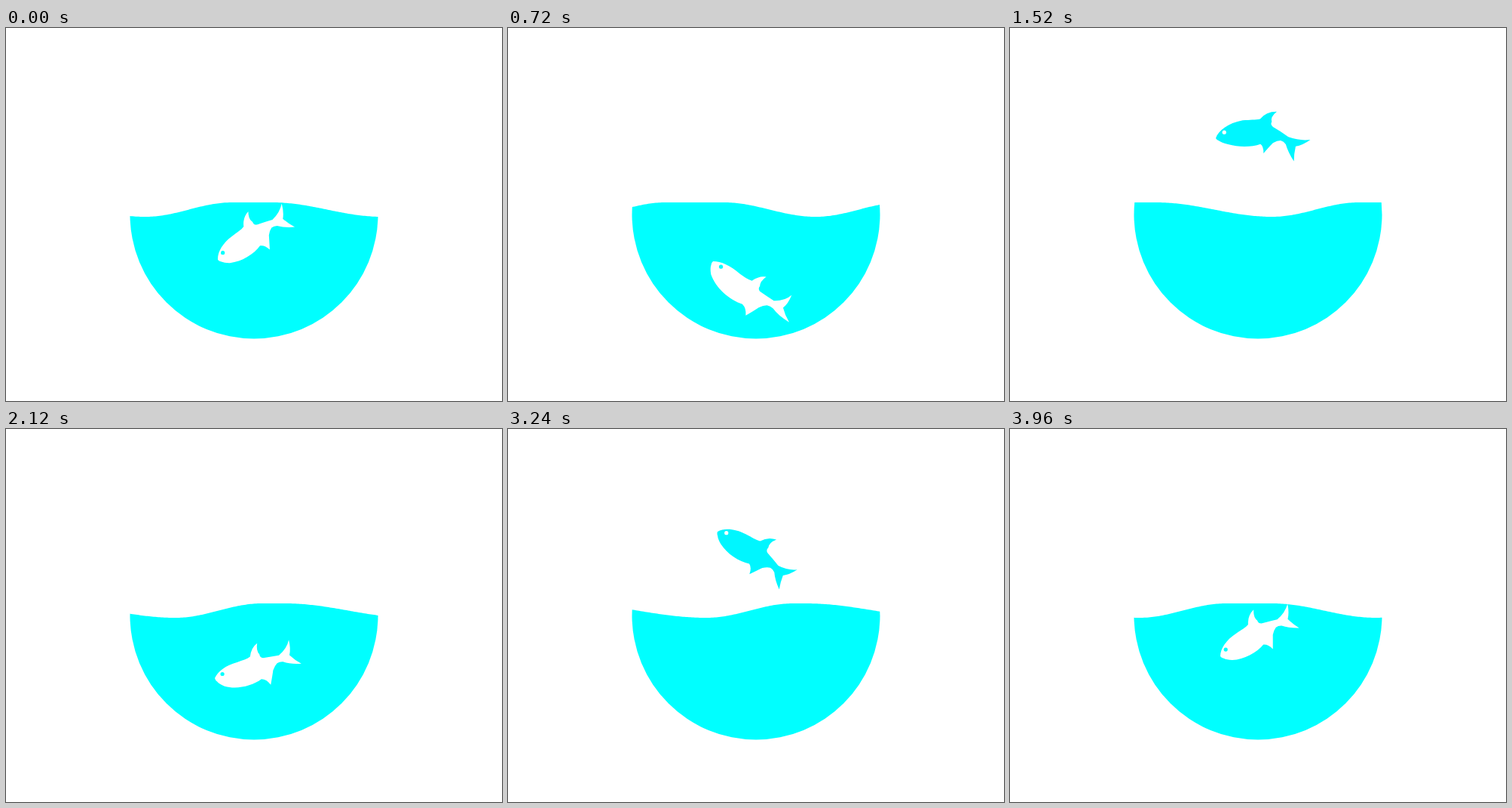
Recreate the animation shown at these times as an HTML page. Size 658 by 494 pixels, loop 4000 ms.

```html
<!DOCTYPE html>
<html lang="en">
<head>
<meta charset="utf-8">
<title>Fish bowl</title>
<style>
  html, body { margin: 0; width: 100%; height: 100%; overflow: hidden; background: #fff; }
  svg { display: block; width: 100vw; height: 100vh; }
</style>
</head>
<body>
<svg viewBox="0 0 658 494">
  <defs>
    <clipPath id="bowl"><circle cx="329" cy="247" r="164.5"/></clipPath>
    <clipPath id="under"><path class="wave"/></clipPath>
  </defs>
  <g fill="#00f6ff"><path class="fish"/><circle class="eye" r="2.6" fill="#fff"/></g>
  <g clip-path="url(#bowl)"><path class="wave" fill="#0ff"/></g>
  <g clip-path="url(#under)" fill="#fff"><path class="fish"/><circle class="eye" r="2.6" fill="#0ff"/></g>
</svg>
<script>
const LOOP = 4000, STEP = 40, SWIM = 2000, ROLL = 1000;
const LENGTH = 112;

// time, nose x, nose y, tail x, tail y, bend of the spine
const poses = [
  [0, 281, 307, 375, 248, 4],
  [120, 277, 330, 384, 295, -2.5],
  [240, 274, 351, 384, 333, -6],
  [400, 272, 356, 382, 361, -10],
  [560, 271, 335, 380, 375, -11],
  [680, 272, 313, 377, 374.5, -10],
  [720, 272, 309, 375, 372, -10],
  [800, 272, 298, 374, 366, -9],
  [960, 275, 222, 367, 299, -3],
  [1120, 277, 153, 366, 225, 3],
  [1240, 278, 136, 372, 200, 6.5],
  [1360, 275, 131, 382, 174, 13],
  [1520, 273, 146, 388, 163, 19],
  [1680, 274, 190, 388, 192, 14],
  [1920, 277, 262, 386, 240, 8],
  [1960, 279, 301, 376.5, 247.5, 4]
];

// fish coordinates: distance from the nose, height above the spine
const outline = `M0,0 C6,8 18,13 34,13 C42,13.5 48,13 53,15 Q58,26 68,29 Q63,20 66,14
  Q65,10 69,8 Q80,6 90,4 Q103,8 110,18 Q108,6 103,-1 Q107,-10 113,-17.5
  Q100,-13 92,-6 Q88,-4 84,-5 Q80,-7 76,-12 Q73,-18 67,-29 Q64,-20 58,-18
  C44,-23 24,-22 10,-13.5 Q4,-9 2,-5 Q0,-3 0,0Z`;

const setAll = (selector, attrs) => {
  for (const el of document.querySelectorAll(selector))
    for (const name in attrs) el.setAttribute(name, attrs[name]);
};

// pose by index, wrapping round the swim cycle
function poseAt(i) {
  const n = poses.length, lap = Math.floor(i / n);
  const [time, ...rest] = poses[i - lap * n];
  return [time + lap * SWIM, ...rest];
}

// monotone cubic interpolation between poses
function swim(t) {
  let i = poses.length - 1;
  while (poses[i][0] > t) i--;
  const [a, b, c, d] = [i - 1, i, i + 1, i + 2].map(poseAt);
  const span = c[0] - b[0], u = (t - b[0]) / span;
  const slope = (p, q, k) => (q[k] - p[k]) / (q[0] - p[0]);
  const blend = (m, n) => m * n > 0 ? 2 * m * n / (m + n) : 0;
  return [1, 2, 3, 4, 5].map(k => {
    const mid = slope(b, c, k);
    const m0 = blend(slope(a, b, k), mid) * span;
    const m1 = blend(mid, slope(c, d, k)) * span;
    const v = 1 - u;
    return b[k] * (1 + 2 * u) * v * v + m0 * u * v * v
      + c[k] * u * u * (3 - 2 * u) - m1 * u * u * v;
  });
}

function drawFish(t) {
  const [nx, ny, tx, ty, bend] = swim(t);
  const dx = (tx - nx) / LENGTH, dy = (ty - ny) / LENGTH;
  const len = Math.hypot(dx, dy), ux = dy / len, uy = -dx / len;
  const place = (s, h) => {
    const u = s / LENGTH;
    const tilt = Math.atan(4 * bend * (1 - 2 * u) / LENGTH);
    const along = s - h * Math.sin(tilt);
    const up = 4 * bend * u * (1 - u) + h * Math.cos(tilt);
    return [nx + dx * along + ux * up, ny + dy * along + uy * up];
  };
  const d = outline.replace(/(-?[\d.]+),(-?[\d.]+)/g,
    (_, s, h) => place(+s, +h).map(v => v.toFixed(2)).join(","));
  const [cx, cy] = place(11, 3);
  setAll(".fish", { d });
  setAll(".eye", { cx, cy });
}

// a trough rolls right: short rise behind it, longer fall ahead of it
function drawWave(t) {
  const p = t / ROLL, turn = 2 * Math.PI;
  const wave = 314, rise = 115;
  const fall = 152 + 32 * Math.sin(turn * (p - 0.03));
  const trough = 185 + wave * p + 3 * Math.sin(turn * p);
  const ease = u => (1 - Math.cos(Math.PI * Math.min(1, u))) / 2;
  let d = "M160,420";
  for (let x = 160; x <= 498; x += 2) {
    const r = (((x - trough) % wave) + wave) % wave;
    const lift = Math.min(ease(r / rise), ease((wave - r) / fall));
    d += `L${x},${(250 - 19 * lift).toFixed(2)}`;
  }
  setAll(".wave", { d: d + "V420Z" });
}

function draw(time) {
  const t = Math.floor(time % LOOP / STEP) * STEP;
  drawWave(t % ROLL);
  drawFish(t % SWIM);
}

const start = performance.now();
function tick() {
  draw(performance.now() - start);
  requestAnimationFrame(tick);
}
tick();
</script>
</body>
</html>
```
